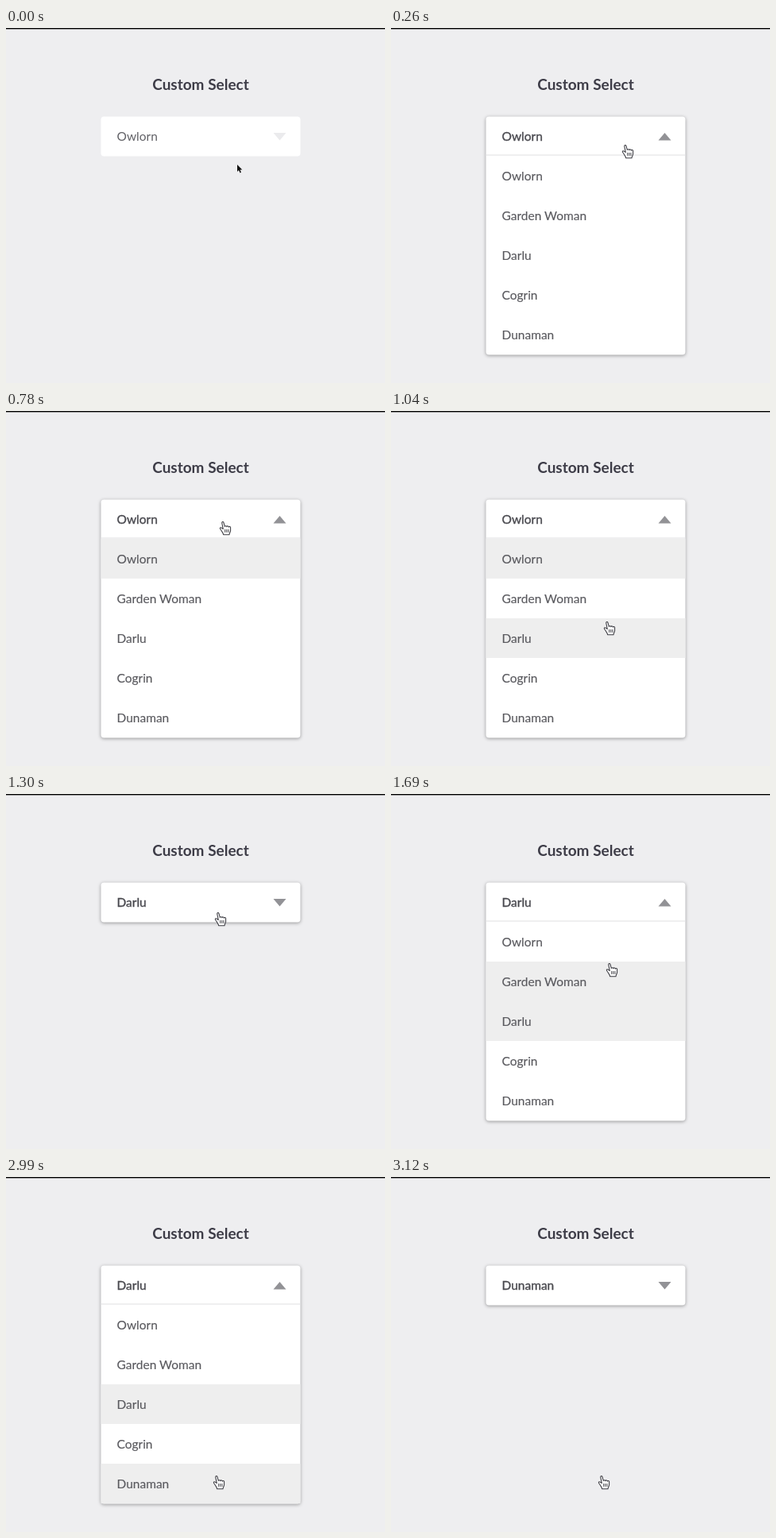
Animation, 477 px wide and 447 px high, one loop 3.25 s. Source, as an HTML page:

```html
<!DOCTYPE html>
<html lang="en">
<head>
<meta charset="utf-8">
<title>Custom Select</title>
<style>
  html, body { margin: 0; width: 100%; height: 100%; overflow: hidden; background: #eeeef0; }
  svg { display: block; width: 100vw; height: 100vh; }
  text { font: 15.5px Lato, "Open Sans", sans-serif; fill: #5a5a5f; stroke: #5a5a5f; stroke-width: .15px; }
  .title { font-size: 19px; font-weight: 700; fill: #3d3c47; stroke: none; text-anchor: middle; }
  #value { fill: #4b4b51; stroke: #4b4b51; stroke-width: .4px; }
  #box { fill: #fff; filter: drop-shadow(0 1.5px 2px rgba(0, 0, 0, .38)); }
  #arrow { fill: #929296; }
  .idle #box { filter: none; }
  .idle #arrow { fill: #ebebed; }
  .idle #value { fill: #626267; stroke: none; }
  .row rect { fill: none; }
  .row.on rect { fill: #eee; }
  #hand { fill: #fff; stroke: #3a3a40; stroke-linejoin: round; stroke-linecap: round; }
  #pointer { fill: #111; stroke: #fff; stroke-width: .7; paint-order: stroke; }
</style>
</head>
<body>
<svg viewBox="0 0 477 447">
  <rect width="477" height="447" fill="#eeeef0"/>
  <rect width="477" height="1.4"/>
  <text class="title" x="245" y="78">Custom Select</text>
  <g id="select">
    <rect id="box" x="119.5" y="111.5" width="251" height="50" rx="4"/>
    <text id="value" x="139.5" y="142"></text>
    <path id="arrow"/>
    <g id="list">
      <path d="M119.5 160H370.5" stroke="#e0e0e2" stroke-width="1.2"/>
    </g>
  </g>
  <path id="pointer" d="M0 0V9L2 7.1L3.5 10.4L5 9.7L3.6 6.5H6.4Z"/>
  <g id="hand">
    <path d="M4.5 9.5C3 8 1.3 7.4 .8 8.3C.4 9.1 1.8 10.4 2.8 12C3.8 13.8 4.6 14.2 4.8 16.2H11.8C11.8 14.6 13 13.5 13.3 11.5V7.5C13.2 6.3 11.5 6.3 11.3 7.3C11.2 5.8 9 5.6 8.8 6.8C8.6 5.6 6.8 5.5 6.4 6.5L5.2 2C4.8 .5 2.8 .8 3.1 2.4Z"/>
    <path d="M6.8 10.3V13.2M8.8 10.3V13.2M10.8 10.3V13.2" stroke-width=".9"/>
  </g>
</svg>
<script>
  const TICK = 130, TICKS = 25, TOP = 161, ROW = 50;
  const names = ["Owlorn", "Garden Woman", "Darlu", "Cogrin", "Dunaman"];

  // Cursor stops as [tick, x, y]; each click opens the list or picks the row below the cursor.
  const stops = [
    [0, 291, 172], [1, 291, 147], [2, 291, 147], [4, 274, 176],
    [6, 269, 139], [8.5, 268, 280], [10, 263, 149], [13, 271, 213],
    [15, 269, 325], [17, 266, 374], [19, 265, 354], [22, 265, 354], [23, 261, 376]
  ];
  const clicks = [2, 3.5, 6, 8.5, 10.5, 23.5];

  const $ = id => document.getElementById(id);
  const show = (el, on) => el.setAttribute("visibility", on ? "visible" : "hidden");
  const ease = u => u * u * (3 - 2 * u);

  function cursorAt(t) {
    const next = stops.findIndex(s => s[0] > t);
    if (next < 0) return stops[stops.length - 1].slice(1);
    const a = stops[next - 1], b = stops[next];
    const u = ease((t - a[0]) / (b[0] - a[0]));
    return [a[1] + (b[1] - a[1]) * u, a[2] + (b[2] - a[2]) * u];
  }

  const rowAt = t => Math.floor((cursorAt(t)[1] + 1 - TOP) / ROW);

  function stateAt(t) {
    let open = false, chosen = -1;
    for (const click of clicks.filter(c => c <= t)) {
      if (open) chosen = rowAt(click);
      open = !open;
    }
    return { open, chosen };
  }

  const make = (tag, attrs, parent) => {
    const el = document.createElementNS("http://www.w3.org/2000/svg", tag);
    for (const key in attrs) el.setAttribute(key, attrs[key]);
    return parent.appendChild(el);
  };

  const rows = names.map((name, i) => {
    const y = TOP + i * ROW;
    const row = make("g", { class: "row" }, $("list"));
    make("rect", { x: 119.5, y, width: 251, height: ROW }, row);
    make("text", { x: 139.5, y: y + 30.5 }, row).textContent = name;
    return row;
  });

  function render(t) {
    const [x, y] = cursorAt(t).map(Math.round);
    const { open, chosen } = stateAt(t);
    const idle = t === 0, hover = rowAt(t);
    $("select").setAttribute("class", idle ? "idle" : "");
    $("box").setAttribute("height", open ? 300 : 50);
    $("value").textContent = names[Math.max(chosen, 0)];
    $("arrow").setAttribute("d", open ? "M336.5 141.5L344.5 132L352.5 141.5Z" : "M336.5 132L344.5 141.5L352.5 132Z");
    show($("list"), open);
    rows.forEach((row, i) => row.classList.toggle("on", i === hover || i === chosen));
    $("pointer").setAttribute("transform", `translate(${x} ${y})`);
    $("hand").setAttribute("transform", `translate(${x - .5} ${y - .5}) scale(1.06)`);
    show($("pointer"), idle);
    show($("hand"), !idle);
  }

  let last = -1;
  function loop(now) {
    const tick = Math.floor(now / TICK) % TICKS;
    if (tick !== last) render(last = tick);
    requestAnimationFrame(loop);
  }
  loop(performance.now());
</script>
</body>
</html>
```
